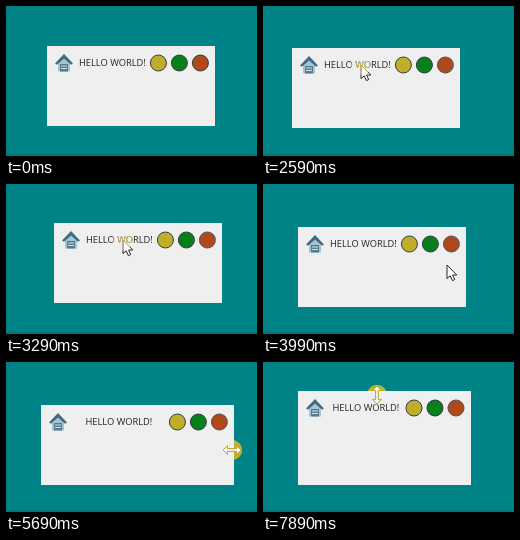
Animation, 251 px wide and 150 px high, one loop 7.99 s. Source, as an HTML page:

```html
<!DOCTYPE html>
<html lang="en">
<head>
<meta charset="utf-8">
<title>Custom window</title>
<style>
  html, body { margin: 0; width: 100%; height: 100%; overflow: hidden; background: #008387; }
  svg { display: block; width: 251px; height: 150px; isolation: isolate; }
  text { font: 9.3px "Open Sans", "Noto Sans", sans-serif; fill: #222; }
  .dot { stroke: #343c4c; stroke-width: 1; }
  .pointer { fill: #fff; stroke: #111; stroke-width: .9; stroke-linejoin: round; }
  .press { fill: #c0b02c; }
  #glow { mix-blend-mode: lighten; }
</style>
</head>
<body>
<svg viewBox="0 0 251 150">
  <rect width="251" height="150" fill="#008387"/>
  <rect y="148" width="251" height="2" fill="#00757a"/>
  <circle id="halo" class="press" r="10"/>
  <g id="win">
    <rect id="panel" width="168" height="80" fill="#efefef"/>
    <g id="house">
      <path d="M11 16 17 10 23 16V25.5H11Z" fill="#a5c5d2"/>
      <path d="M8 17.5 17 8 26 17.5 24 18.8 17 12.5 10 18.8Z" fill="#426a84"/>
      <path d="M13 18H21V25.5H13Z" fill="#527b92"/>
      <path d="M14 20H20M14 22.5H20" stroke="#d5e4ea"/>
    </g>
    <text id="label" y="20.4">HELLO WORLD!</text>
    <g id="dots">
      <circle class="dot" cx="-57" cy="17" r="8" fill="#bfae2a"/>
      <circle class="dot" cx="-36" cy="17" r="8" fill="#08801a"/>
      <circle class="dot" cx="-15" cy="17" r="8" fill="#b0481a"/>
      <circle id="focus" cx="-15" cy="17" r="8" fill="none" stroke="#ccc" stroke-opacity=".6" stroke-dasharray="1 1.2"/>
    </g>
  </g>
  <g id="cursor" class="pointer">
    <path id="arrow" d="M0 0V13.6L3.2 10.8 5.4 15.6 7.7 14.6 5.6 10H9.8Z"/>
    <path id="resize" d="M-9 0-4.5-4.3V-1.4H4.5V-4.3L9 0 4.5 4.3V1.4H-4.5V4.3Z"/>
  </g>
  <circle id="glow" class="press" r="10"/>
</svg>
<script>
  const LOOP = 7990, STEP = 100, PHASE = 90;
  const $ = id => document.getElementById(id);

  // Each key is [time, ...values].
  const place = [
    [2390, 41, 40], [2490, 37, 40], [2590, 29, 42], [2690, 18, 46], [2790, 13, 50],
    [2890, 22, 52], [2990, 38, 51], [3090, 51, 48], [3190, 56, 43], [3290, 48, 39],
    [3390, 41, 40], [3490, 37, 42], [3590, 35, 43]
  ];
  const widen = [[5090, 0], [5290, 9], [5490, 21], [5590, 26], [5790, 23], [5890, 20], [6090, 7], [6190, 5]];
  const raise = [[7590, 0], [7690, 5], [7790, 10], [7890, 14]];
  const roam = [
    [790, 240, 135], [890, 184, 143], [1590, 90, 131], [1690, 84, 118], [1790, 81, 104],
    [1990, 92, 78], [2190, 107, 59], [2290, 110, 57], [3590, 104, 60], [3690, 110, 63],
    [3990, 184, 81], [4190, 206, 85], [4490, 204, 86], [4790, 201, 88], [6190, 206, 88],
    [6490, 111, 78], [6590, 113, 67], [6790, 113, 53], [6890, 114, 48], [7090, 114, 47]
  ];

  function at(keys, t) {
    const i = keys.findIndex(k => k[0] > t);
    if (i === 0) return keys[0].slice(1);
    if (i < 0) return keys[keys.length - 1].slice(1);
    const a = keys[i - 1], b = keys[i], p = (t - a[0]) / (b[0] - a[0]);
    return a.slice(1).map((v, n) => v + (b[n + 1] - v) * p);
  }

  const within = (t, from, to) => t >= from && t < to;
  const move = (id, x, y = 0) => $(id).setAttribute("transform", `translate(${x} ${y})`);
  const show = (id, on) => { $(id).style.display = on ? "" : "none"; };

  function draw(time) {
    const t = PHASE + Math.floor((time - PHASE) / STEP) * STEP;
    const [x, baseY] = at(place, t).map(Math.round);
    const grow = Math.round(at(widen, t)[0]);
    const rise = Math.round(at(raise, t)[0]);
    const y = baseY - rise, width = 168 + grow;

    move("win", x, y);
    $("panel").setAttribute("width", width);
    $("panel").setAttribute("height", 80 + rise);
    move("label", 32 + grow / 2);
    move("dots", width + (t < 5890 ? 0.4 : 0));
    show("focus", t >= 2490);

    const dragging = within(t, 2490, 3600);
    const widening = within(t, 5090, 6200);
    const raising = t >= 7590;
    let [cx, cy] = at(roam, t);
    if (dragging) [cx, cy] = [x + 69, y + 17];
    if (widening) [cx, cy] = [x + width - 2, 88];
    if (raising) [cx, cy] = [114, y + 4];

    const vertical = t >= 6890;
    const resizing = vertical || within(t, 4590, 6200);
    move("cursor", cx, cy);
    show("cursor", within(t, 790, 990) || t >= 1590);
    show("arrow", !resizing);
    show("resize", resizing);
    $("resize").setAttribute("transform", vertical ? "rotate(90)" : "");

    for (const id of ["halo", "glow"]) {
      move(id, cx, cy);
      show(id, dragging || widening || raising);
    }
  }

  const start = performance.now();
  function tick() {
    draw((performance.now() - start) % LOOP);
    requestAnimationFrame(tick);
  }
  tick();
</script>
</body>
</html>
```
